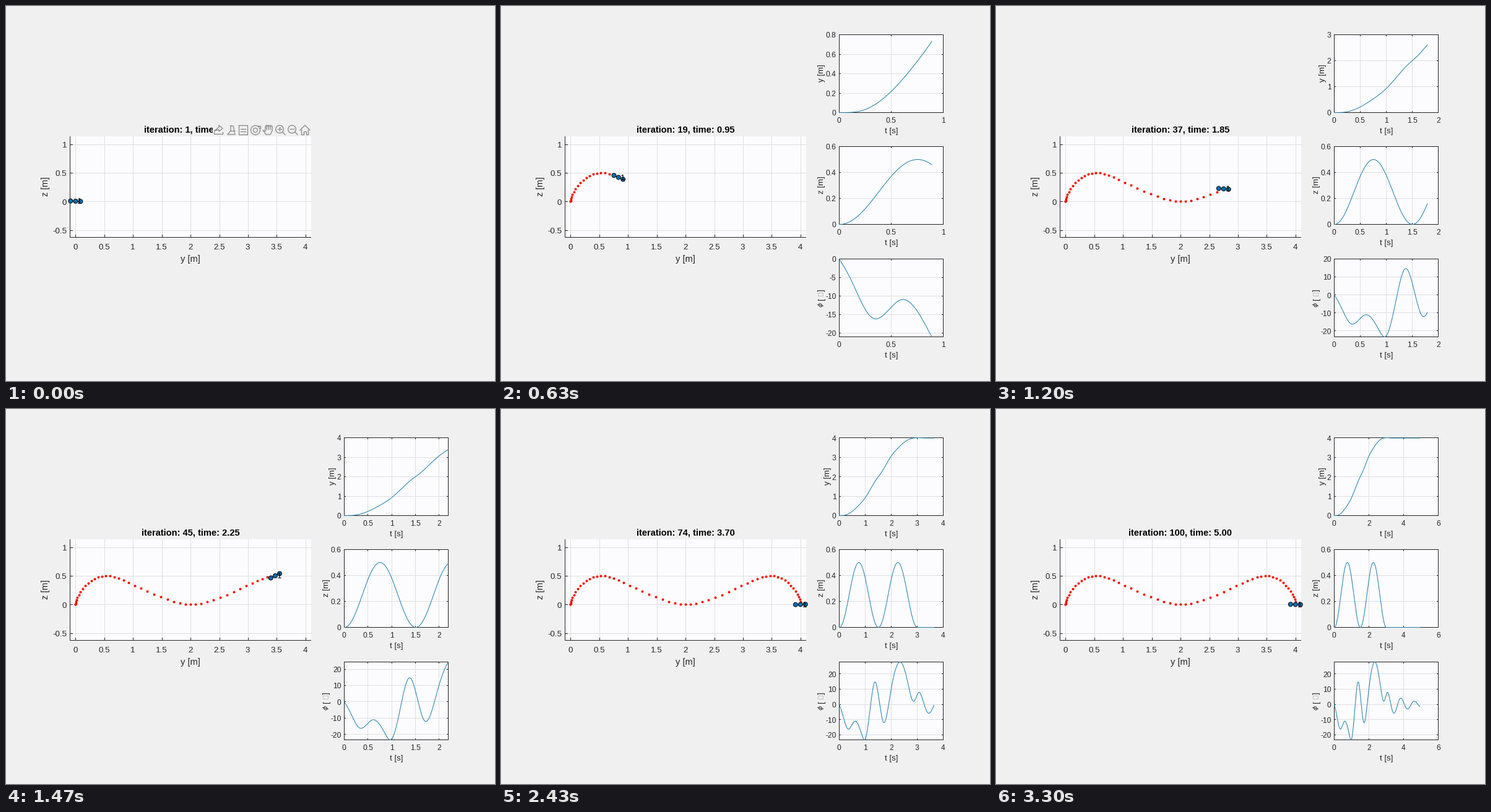
Recreate the animation shown at these times as a matplotlib script. Size 790 by 607 pixels, loop 3.33 s.

```python
import math

import matplotlib.pyplot as plt
import numpy as np
from matplotlib.animation import FuncAnimation
from matplotlib.patches import Circle, Rectangle

W, H, DPI = 790, 607, 100
PX = 72 / DPI
STEPS, DT = 100, 0.05

BACK, PAPER, GRID = "#f0f0f0", "#fcfcff", "#dfdfe1"
INK, CURVE, RED, ROTOR, ICON = "#262626", "#237da8", "#ee1000", "#0070b4", "#8a8a8a"

# Main view: pixel box, pixel of the world origin and pixels per metre
LEFT, RIGHT, TOP, BOTTOM = 103, 493, 211, 374
X0, Z0, SCALE = 112.4, 316.4, 92.86
ARM = 0.086

# Side plots
PL, PR, PH = 546, 714, 126
PLOT_TOPS = (46, 227, 409)

fig = plt.figure(figsize=(W / DPI, H / DPI), dpi=DPI, facecolor=BACK)
ax = fig.add_axes([0, 0, 1, 1])
ax.set_xlim(0, W)
ax.set_ylim(H, 0)
ax.axis("off")


def spline(points):
    """Natural cubic spline through (x, y) points."""
    x, y = np.array(points, float).T
    h, n = np.diff(x), len(x)
    slope = np.diff(y) / h
    a, b = np.eye(n), np.zeros(n)
    for i in range(1, n - 1):
        a[i, i - 1:i + 2] = h[i - 1], 2 * (h[i - 1] + h[i]), h[i]
        b[i] = 6 * (slope[i] - slope[i - 1])
    m = np.linalg.solve(a, b)

    def f(t):
        i = np.clip(np.searchsorted(x, t, side="right") - 1, 0, n - 2)
        d = t - x[i]
        first = slope[i] - h[i] * (2 * m[i] + m[i + 1]) / 6
        return y[i] + d * (first + d * (m[i] / 2 + d * (m[i + 1] - m[i]) / (6 * h[i])))

    return f


# The second half of the flight mirrors the first
half = [(0, 0), (.1, .0015), (.2, .015), (.4, .125), (.75, .527),
        (1, .926), (1.2, 1.367), (1.4, 1.817)]
flight = spline(half + [(1.5, 2)] + [(3 - t, 4 - y) for t, y in half[::-1]])


def y_pos(t):
    overshoot = .015 * np.exp(-((t - 3.05) / .15) ** 2)
    return np.maximum(flight(np.minimum(t, 3)), 0) + overshoot


def z_pos(t):
    lagged = np.clip(t - .004, 0, 3)
    return .25 * (1 - np.cos(2 * np.pi * lagged / 1.5))


def ringing(t):
    d = t - 3.07
    return 8 * math.exp(-.85 * d) * math.cos(2 * math.pi * d / .78)


# Tilt in degrees: swings during the flight, then a damped oscillation
phi = spline([(0, 0), (.1, -4.9), (.32, -16), (.6, -11), (.85, -19), (.99, -23),
              (1.18, -4), (1.37, 14.7), (1.69, -11.6), (1.97, 7.6), (2.41, 27),
              (2.64, 14), (2.86, 2)]
             + [(t, ringing(t)) for t in np.arange(3.07, 5.2, .1)])


def line(xs, ys, color=INK, width=1, **kw):
    return ax.plot(xs, ys, color=color, lw=width * PX, **kw)[0]


def text(x, y, s, size=12, ha="center", rot=0, color=INK, **kw):
    """Text whose digits are centred on y (or on x when upright)."""
    shift = .36 * size
    pos = (x + shift, y) if rot else (x, y + shift)
    kw.setdefault("family", "Liberation Sans")
    return ax.text(*pos, s, size=size * PX, ha=ha, va="baseline", rotation=rot,
                   rotation_mode="anchor", color=color, **kw)


def circle(x, y, r, face, edge, width=1, **kw):
    return ax.add_patch(Circle((x, y), r, fc=face, ec=edge, lw=width * PX, **kw))


def box(x0, y0, x1, y1, face, edge="none", **kw):
    return ax.add_patch(Rectangle((x0, y0), x1 - x0, y1 - y0, fc=face, ec=edge,
                                  lw=PX, **kw))


def main_px(y, z):
    return X0 + SCALE * y, Z0 - SCALE * z


def draw_main_axes():
    box(LEFT, TOP, RIGHT, BOTTOM, PAPER)
    for k in range(9):
        x, _ = main_px(k / 2, 0)
        line([x, x], [TOP, BOTTOM], GRID)
        line([x, x], [BOTTOM - 4, BOTTOM])
        text(x - .3, 389.5, f"{k / 2:g}", 13.33)
    for v in (-.5, 0, .5, 1):
        _, y = main_px(0, v)
        line([LEFT, RIGHT], [y, y], GRID)
        line([LEFT, LEFT + 4], [y, y])
        text(98, y + .7, f"{v:g}", 13.33, "right")
    line([LEFT, LEFT, RIGHT - 1], [TOP, BOTTOM, BOTTOM])
    text(298, 408.3, "y [m]", 14.67)
    text(62.5, 292.3, "z [m]", 14.67, rot=90)


def draw_panels():
    """Fixed parts of the three side plots."""
    items = []
    for top in PLOT_TOPS:
        items.append(box(PL, top, PR, top + PH, PAPER))
        items.append(text(631, top + PH + 29.7, "t [s]", 13.2))
    items.append(text(516, 483.5, "ϕ", 11, rot=90, family="DejaVu Sans", style="italic"))
    items.append(text(516, 474, "[", 13.2, rot=90))
    items.append(text(516, 460.5, "]", 13.2, rot=90))
    items.append(box(512, 464, 520, 469, "none", "#c4c4c4"))
    return items


def draw_toolbar():
    """Row of small outline icons over the end of the title."""
    items = [box(333.5, 190, 494, 210.5, BACK, zorder=5)]

    def stroke(*points):
        items.append(line(*zip(*points), ICON, 1.3, zorder=6))

    def ring(x, y, r):
        items.append(circle(x, y, r, "none", ICON, 1.3, zorder=6))

    # share
    stroke((336, 204), (336, 207), (350, 207), (350, 204))
    stroke((337, 202), (344, 196), (344, 193), (350, 198), (344, 203), (344, 200), (337, 202))
    # brush
    stroke((363, 194), (367, 194), (370, 208), (358, 208), (363, 202), (363, 194))
    stroke((362, 202), (369, 202))
    # data tip
    stroke((376, 193), (390, 193), (390, 208), (376, 208), (376, 193))
    for y in (199, 203):
        stroke((379, y), (387, y))
    # rotate
    ring(403, 201, 7.5)
    ring(403, 201, 3.5)
    stroke((407, 194), (411, 194), (411, 198))
    # hand
    stroke((420, 208), (415, 201), (419, 203), (419, 195), (421, 193))
    for x in (421, 424, 427):
        stroke((x, 200), (x, 193), (x + 3, 195))
    stroke((430, 195), (430, 202), (427, 208), (420, 208))
    # zoom in, zoom out
    for x in (442, 462):
        ring(x, 199.5, 6.3)
        stroke((x + 5, 204), (x + 9, 208.5))
        stroke((x - 3, 199), (x + 3, 199))
    stroke((442, 196), (442, 202))
    # home
    stroke((475, 201), (483, 193), (491, 201))
    stroke((477, 200), (477, 208), (481, 208), (481, 203), (485, 203), (485, 208),
           (488, 208), (488, 200))
    return items


def nice_axis(lo, hi):
    """Limits and ticks: align to ticks when little room is lost, else stay tight."""
    base = 10.0 ** math.floor(math.log10(hi - lo))
    for fit_lo, fit_hi in ((1, 1), (0, 1), (1, 0), (0, 0)):
        for step in (base * m for m in (.1, .2, .5, 1, 2, 5)):
            a = step * math.floor(lo / step + 1e-9) if fit_lo else lo
            b = step * math.ceil(hi / step - 1e-9) if fit_hi else hi
            first = math.ceil(a / step - 1e-9)
            last = math.floor(b / step + 1e-9)
            if 3 <= last - first + 1 <= 5 and (hi - lo) / (b - a) >= .815:
                return a, b, [step * k for k in range(first, last + 1)]
    return lo, hi, [lo, hi]


def tick_labels(ticks):
    """Labels and the shared power of ten (0 when none is needed)."""
    power = math.floor(math.log10(max(abs(v) for v in ticks)) + 1e-9)
    power = power if power < -2 else 0
    return [f"{round(v / 10.0 ** power, 6) + 0:g}" for v in ticks], power


def label_width(s, size=12):
    return size * sum({".": .278, "-": .333}.get(c, .556) for c in s)


def draw_plot(top, t, values, name):
    items = []
    bottom = top + PH
    x_lo, x_hi, x_ticks = nice_axis(0, t[-1])
    v_lo, v_hi, v_ticks = nice_axis(min(values.min(), 0), max(values.max(), 0))

    def px(v):
        return PL + (PR - PL) * (v - x_lo) / (x_hi - x_lo)

    def py(v):
        return bottom - PH * (v - v_lo) / (v_hi - v_lo)

    x_names, _ = tick_labels(x_ticks)
    v_names, power = tick_labels(v_ticks)
    for v, s in zip(x_ticks, x_names):
        x = px(v)
        items.append(line([x, x], [top, bottom], GRID))
        for y0, y1 in ((top, top + 2), (bottom - 2, bottom)):
            items.append(line([x, x], [y0, y1]))
        items.append(text(x + .3, bottom + 12.7, s))
    for v, s in zip(v_ticks, v_names):
        y = py(v)
        items.append(line([PL, PR], [y, y], GRID))
        for x0, x1 in ((PL, PL + 2), (PR - 2, PR)):
            items.append(line([x0, x1], [y, y]))
        items.append(text(541.5, y + 1, s, ha="right"))
    if power:
        items.append(text(PL, top - 7, "×10", ha="left"))
        items.append(text(PL + 21, top - 13, str(power), 9.5, "left"))
    items.append(line([PL, PR, PR, PL, PL], [top, top, bottom, bottom, top]))
    items.append(line(px(t) + .5, py(values) + .5, CURVE, zorder=3))
    if name:
        x = 542 - max(map(label_width, v_names)) - 8.6
        items.append(text(x, top + PH / 2, name, 13.2, rot=90))
    return items


def draw_robot(t):
    y, z, tilt = float(y_pos(t)), float(z_pos(t)), math.radians(float(phi(t)))
    reach = [-ARM, 0, ARM]
    xs = [X0 + SCALE * (y + r * math.cos(tilt)) for r in reach]
    ys = [Z0 - SCALE * (z + r * math.sin(tilt)) for r in reach]
    items = [line(xs, ys, "black", 1.2, zorder=4)]
    items[0].set_clip_path(frame_clip)
    items += [circle(x, v, 3.4, ROTOR, "#0c1c24", 1.2, zorder=4)
              for x, v in zip(xs, ys) if x < RIGHT]
    items.append(text(xs[1] + 3, ys[1] - .5, "1", 13.33, "left", color="black", zorder=5))
    return items


draw_main_axes()
frame_clip = box(LEFT - 8, TOP, RIGHT, BOTTOM, "none")
live = []


def update(i):
    for item in live:
        item.remove()
    live.clear()

    n = i + 1
    live.append(text(298, 199.7, f"iteration: {n}, time: {n * DT:.2f}", 14.67,
                     color="black", weight="bold"))
    past = DT * np.arange(n)
    live.append(ax.plot(*main_px(y_pos(past), z_pos(past)), ls="none", marker="o",
                        ms=4 * PX, mew=0, color=RED, zorder=3)[0])
    live.extend(draw_robot(n * DT))

    if n == 1:
        live.extend(draw_toolbar())
        return
    live.extend(draw_panels())
    t = DT / 10 * np.arange(10 * n - 11)
    for top, f, name in zip(PLOT_TOPS, (y_pos, z_pos, phi), ("y [m]", "z [m]", "")):
        live.extend(draw_plot(top, t, f(t), name))


anim = FuncAnimation(fig, update, frames=STEPS, interval=33.3, repeat=True,
                     repeat_delay=0, init_func=lambda: None, blit=False)
plt.show()
```
